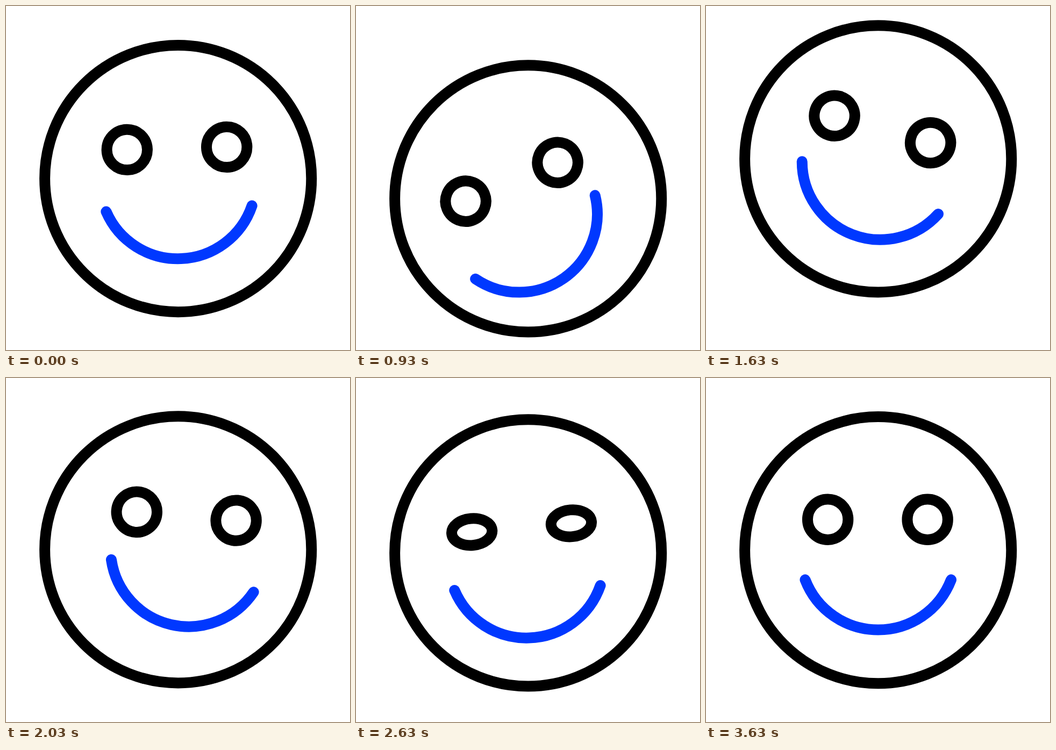
An HTML page for the animation above (3.73 s loop, 640 by 640 pixels).

```html
<!DOCTYPE html>
<html lang="en">
<head>
<meta charset="utf-8">
<title>Nodding smiley</title>
<style>
  html, body { margin: 0; height: 100%; overflow: hidden; background: #fff; }
  svg { display: block; width: 100vw; height: 100vh; }
</style>
</head>
<body>
<svg viewBox="0 0 640 640" fill="none" stroke="#000" stroke-width="20" stroke-linecap="round">
  <circle id="head" r="248.1"/>
  <g id="eyes">
    <ellipse cx="-92.75" rx="37.7" ry="37.7"/>
    <ellipse cx="92.75" rx="37.7" ry="37.7"/>
  </g>
  <path id="mouth" stroke="#0038ff" d="M-135.75 52.2A145.5 145.5 0 0 0 135.75 52.2"/>
</svg>
<script>
const LOOP = 3730, LEAD = 30, STEP = 100;
const EYE_R = 37.7;

const byId = id => document.getElementById(id);
const head = byId("head"), eyes = byId("eyes"), mouth = byId("mouth");

// Smooth ease; snap blends it towards linear for sharper turns.
const ease = (u, snap) => snap * u + (1 - snap) * u * u * (3 - 2 * u);

// One gentle wind-up, two swings of [step, value], then back to rest.
function swing(step, snap, windUp, up, down, restStep) {
  let from = [-1, 0], blend = 0;
  for (const to of [windUp, up, down, [restStep, 0]]) {
    if (step < to[0]) {
      const u = (step - from[0]) / (to[0] - from[0]);
      return from[1] + (to[1] - from[1]) * ease(u, blend);
    }
    from = to;
    blend = snap;
  }
  return 0;
}

const blink = step => 1 - 0.8 * Math.max(0, 1 - Math.abs(step - 28) / 1.73);

function place(el, x, y, turn = 0) {
  el.setAttribute("transform", `translate(${x} ${y}) rotate(${turn})`);
}

function draw(ms) {
  const t = ms % LOOP;
  const s = t < LEAD ? 0 : 1 + Math.floor((t - LEAD) / STEP);

  const headY = swing(s, 0.6, [10, 38.2], [17.5, -39.3], [22.8, 16.5], 29.2);
  const faceY = swing(s, 0.6, [9.6, 67.5], [18, -43.5], [24, 31.5], 29.8);
  const eyesX = swing(s, 0, [7.3, -35.7], [20.3, 17.5], [26, -12], 33);
  const eyesTurn = swing(s, 0, [6.7, -33.1], [18, 16.8], [24, -7], 32.4);
  const mouthX = swing(s, 0, [10.5, -16.8], [23, 22.3], [27, -3], 32);
  const mouthTurn = swing(s, 0, [6.7, -49.9], [18, 22.7], [25.1, -3], 29.7);

  place(head, 320.2, 320.2 + headY);
  place(eyes, 319.4 + eyesX, 263.2 + faceY, eyesTurn);
  place(mouth, 320.25 + mouthX, 323.2 + faceY, mouthTurn);
  for (const eye of eyes.children) eye.setAttribute("ry", EYE_R * blink(s));
}

const start = performance.now();
function tick() {
  draw(performance.now() - start);
  requestAnimationFrame(tick);
}
tick();
</script>
</body>
</html>
```
